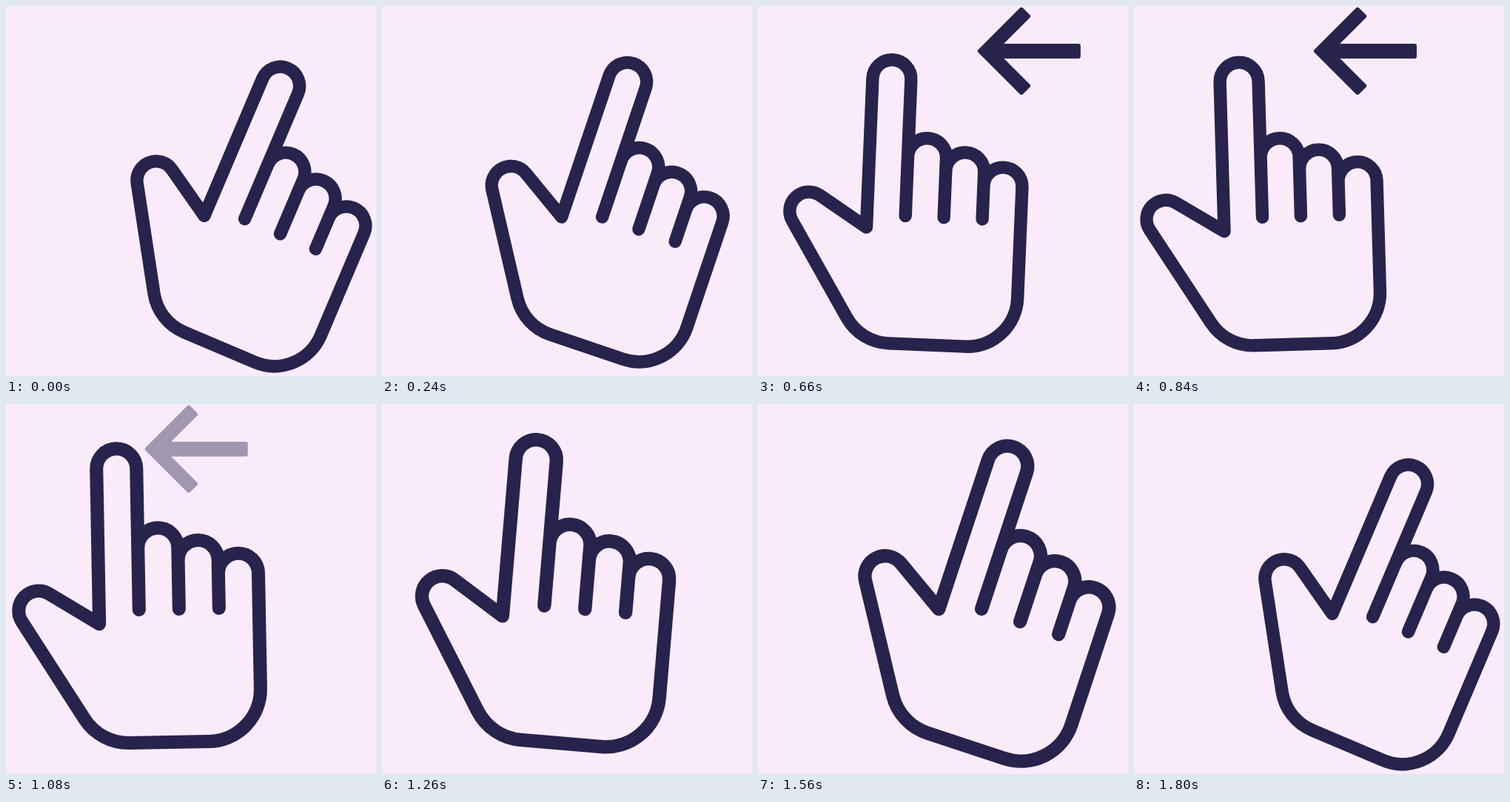
Write an HTML page that moves like this. It is 500 px wide and 500 px high and loops after 2730 ms.

```html
<!DOCTYPE html>
<html lang="en">
<head>
<meta charset="utf-8">
<title>Swipe left</title>
<style>
  html, body { margin: 0; width: 100%; height: 100%; overflow: hidden; background: #f9ebfa; }
  svg { display: block; width: 100%; height: 100%; }
</style>
</head>
<body>
<svg viewBox="0 0 500 500" stroke="#28234d" stroke-linecap="round" stroke-linejoin="round">
  <path id="arrow" fill="#28234d" stroke-width="6"
    d="M-136 0L-80-56L-70.9-47L-106.7-11.2Q-110.7-7-104.7-7H-3V7H-104.7Q-110.7 7-106.7 11.2L-70.9 47L-80 56Z"/>
  <!-- origin: centre of the index fingertip -->
  <path id="hand" fill="none" stroke-width="17.4"
    d="M26 184V0A26 26 0 0 0-26 0V201.5L-90.7 161A26 26 0 0 0-126.7 196.6L-47.4 324.9
       A68 68 0 0 0 10.3 357H114A68 68 0 0 0 182 289V139a26 26 0 0 0-52 0
       M130 184V121a26 26 0 0 0-52 0M78 184V104a26 26 0 0 0-52 0"/>
</svg>
<script>
const LOOP = 2730, STEP = 30;
const hand = document.getElementById('hand');
const arrow = document.getElementById('arrow');
const start = performance.now();

// Smooth 0 to 1 between two times
function ease(t, from, to) {
  const q = Math.min(1, Math.max(0, (t - from) / (to - from)));
  return q * q * (3 - 2 * q);
}

function draw() {
  const elapsed = (performance.now() - start) % LOOP;
  const t = Math.floor(elapsed / STEP) * STEP;

  // Swipe left, then lift (grow) while returning
  const swipe = ease(t, 0, 900) - ease(t, 988, 1780);
  const lift = ease(t, 900, 1200) - ease(t, 1500, 1800);
  hand.setAttribute('transform',
    `translate(${191.2 - 79.4 * swipe} ${428.5 + 40.3 * swipe}) rotate(${23 - 25 * swipe}) ` +
    `scale(${1 + 0.06 * lift}) translate(40 -365)`);

  arrow.setAttribute('transform', `translate(${500 - 182 * ease(t, 300, 1200)} 60.9)`);
  arrow.setAttribute('opacity', ease(t, 300, 570) - ease(t, 930, 1200));

  requestAnimationFrame(draw);
}
draw();
</script>
</body>
</html>
```
